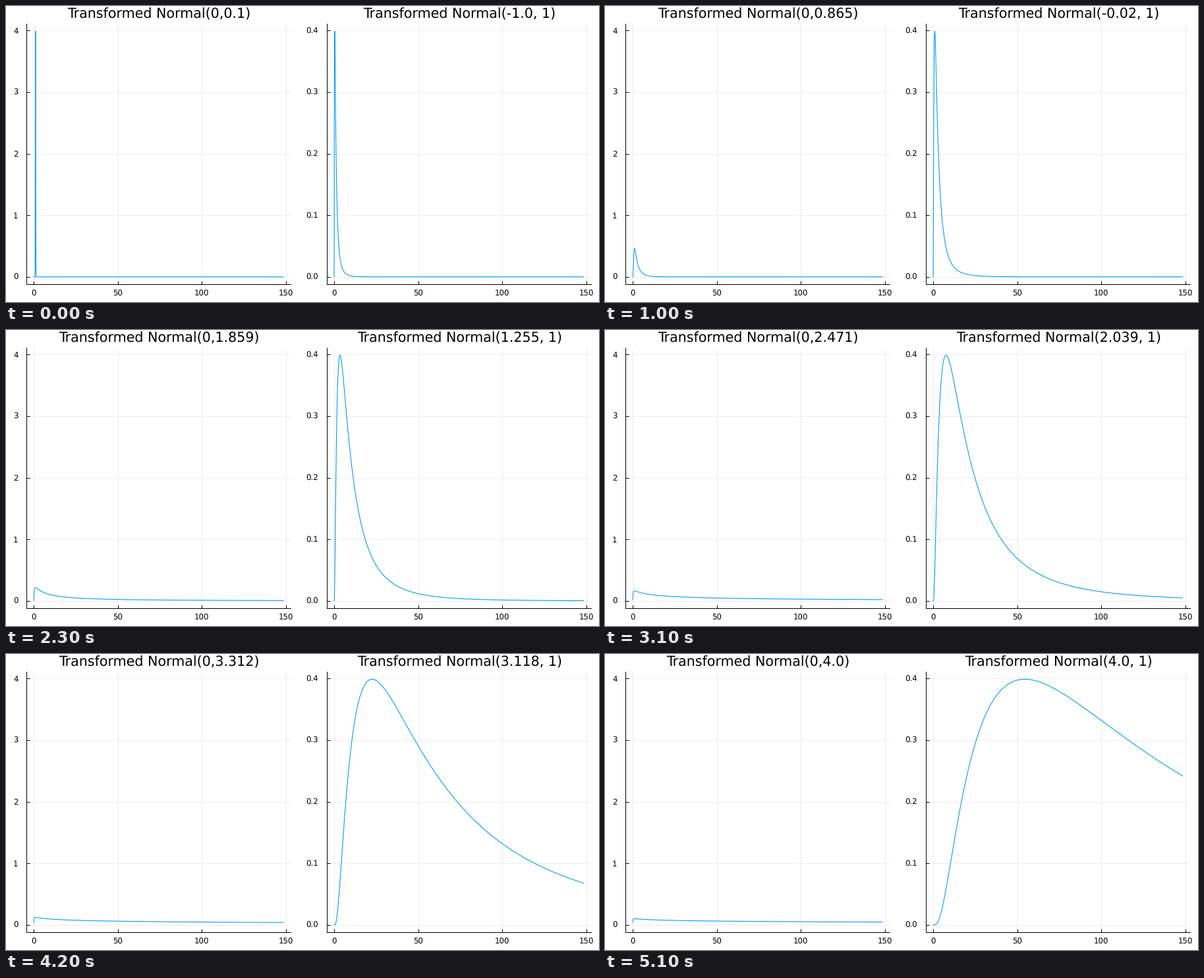
Write a matplotlib script that moves like this. It is 900 px wide and 450 px high and loops after 5200 ms.

```python
import numpy as np
import matplotlib.pyplot as plt
from matplotlib.animation import FuncAnimation

W, H, DPI = 900, 450, 100
FRAMES, INTERVAL = 52, 100
TOP, BOTTOM = 27.2, 423.0
PANEL_WIDTH = 401.4
PT = 72 / DPI  # points per pixel
TITLE_SIZE, LABEL_SIZE = 20.65 * PT, 11.8 * PT

plt.rcParams.update({
    "font.family": "DejaVu Sans",
    "text.hinting": "none",
    "path.simplify": False,
})

log_x = np.linspace(-5, 5, 1001)
x = np.exp(log_x)


def normal_pdf(mean, sigma):
    z = (log_x - mean) / sigma
    return np.exp(-z * z / 2) / (sigma * np.sqrt(2 * np.pi))


def padded(low, high):
    pad = 0.03 * (high - low)
    return low - pad, high + pad


def pixel_text(px, py, text, size, ha):
    return fig.text(px / W, 1 - py / H, text, fontsize=size, ha=ha, va="baseline")


def make_panel(left, peak, yticks, labels):
    """Draw one set of axes and return its curve and title."""
    ax = fig.add_axes([left / W, 1 - BOTTOM / H, PANEL_WIDTH / W, (BOTTOM - TOP) / H])
    ax.set_xlim(*padded(x[0], x[-1]))
    ax.set_ylim(*padded(0, peak))
    ax.set_xticks([0, 50, 100, 150])
    ax.set_yticks(yticks)
    ax.tick_params(direction="in", length=5 * PT, width=PT,
                   labelbottom=False, labelleft=False)
    ax.grid(color="black", alpha=0.07, linewidth=PT)
    ax.set_axisbelow(True)
    ax.spines[["top", "right"]].set_visible(False)
    ax.spines[["left", "bottom"]].set_linewidth(PT)

    x_low, x_high = ax.get_xlim()
    for tick in (0, 50, 100, 150):
        px = left + PANEL_WIDTH * (tick - x_low) / (x_high - x_low)
        pixel_text(px, 441, str(tick), LABEL_SIZE, "center")
    y_low, y_high = ax.get_ylim()
    for tick, label in zip(yticks, labels):
        py = BOTTOM - (BOTTOM - TOP) * (tick - y_low) / (y_high - y_low)
        pixel_text(left - 12.4, py + 4.3, label, LABEL_SIZE, "right")

    curve, = ax.plot([], [], color="#009AFA", linewidth=1.1 * PT)
    title = pixel_text(left + PANEL_WIDTH / 2 + 1, 18, "", TITLE_SIZE, "center")
    return curve, title


fig = plt.figure(figsize=(W / DPI, H / DPI), dpi=DPI, facecolor="white")
peak = 1 / np.sqrt(2 * np.pi)
ticks = np.arange(5)
sigma_curve, sigma_title = make_panel(30.9, 10 * peak, ticks, [str(t) for t in ticks])
mean_curve, mean_title = make_panel(486.6, peak, ticks / 10, [f"{t / 10:.1f}" for t in ticks])


def draw(frame):
    t = frame / (FRAMES - 1)
    sigma = 0.1 + 3.9 * t
    mean = -1 + 5 * t
    sigma_curve.set_data(x, normal_pdf(0, sigma))
    mean_curve.set_data(x, normal_pdf(mean, 1))
    sigma_title.set_text(f"Transformed Normal(0,{round(sigma, 3)})")
    mean_title.set_text(f"Transformed Normal({round(mean, 3)}, 1)")
    return sigma_curve, mean_curve, sigma_title, mean_title


anim = FuncAnimation(fig, draw, frames=FRAMES, interval=INTERVAL,
                     repeat=True, repeat_delay=0, blit=False)
plt.show()
```
